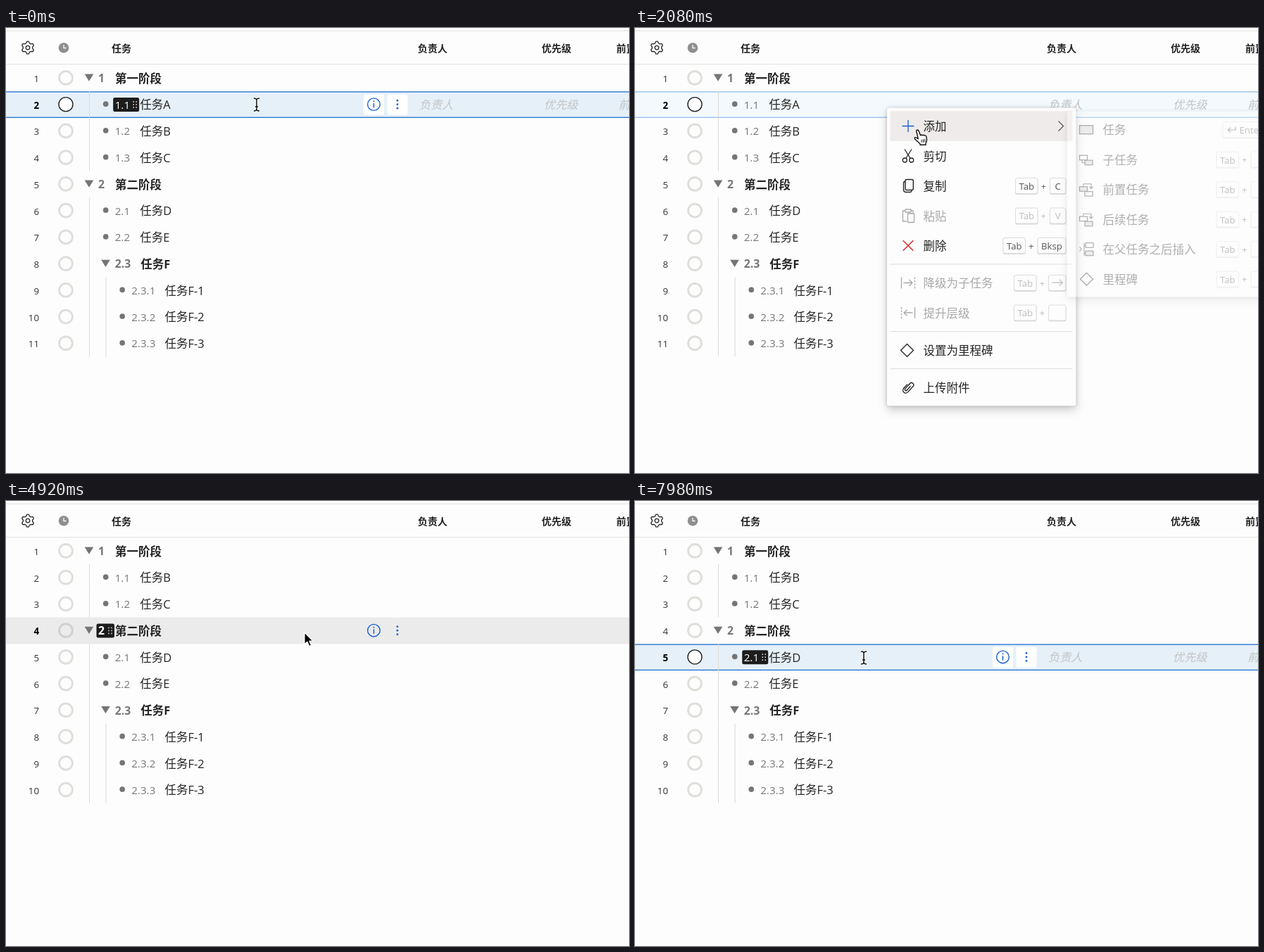
An HTML page for the animation above (8000 ms loop, 885 by 633 pixels).

```html
<!DOCTYPE html>
<html lang="zh-CN">
<head>
<meta charset="utf-8">
<title>任务列表</title>
<style>
html, body { margin: 0; width: 100%; height: 100%; overflow: hidden; background: #fdfdfd; }
svg { display: block; position: absolute; left: 0; top: 0; }
text { font-family: 'Open Sans', 'Noto Sans CJK SC', 'Noto Sans CJK', 'Noto Sans', sans-serif; white-space: pre; }
.popup { filter: drop-shadow(0 6px 7px rgba(0,0,0,.17)) drop-shadow(0 0 2px rgba(0,0,0,.2)); }
</style>
</head>
<body>
<svg id="stage" width="885" height="633" viewBox="0 0 885 633"></svg>
<script>
const LOOP = 8000, ROW = 37.75, TOP = 52.3;
const MENU_OPEN = 780, ENTER = 1640, SUB_OPEN = 2050, ON_CUT = 2440, SUB_CLOSE = 2750, CUT = 4400, SELECT = 7300;
const INK = '#242424', BLUE = '#1a5fd0', DIM = '#a9a9a9';

// drawing helpers, all returning SVG markup
const text = (x, y, s, size, fill = INK, more = '') =>
  `<text x="${x}" y="${y + size * .37}" font-size="${size}" fill="${fill}" ${more}>${s}</text>`;
const rect = (x, y, w, h, fill, more = '') =>
  `<rect x="${x}" y="${y}" width="${w}" height="${h}" fill="${fill}" ${more}/>`;
const circle = (x, y, r, fill, more = '') => `<circle cx="${x}" cy="${y}" r="${r}" fill="${fill}" ${more}/>`;
const path = (d, stroke = INK, width = 1.3, fill = 'none') =>
  `<path d="${d}" stroke="${stroke}" stroke-width="${width}" fill="${fill}" stroke-linejoin="round"/>`;
const at = (x, y, s, more = '') => `<g transform="translate(${x} ${y})" ${more}>${s}</g>`;
const BOLD = 'font-weight="700"', SEMI = 'font-weight="600"', RIGHT = 'text-anchor="end"', MID = 'text-anchor="middle"';
const clamp = v => Math.max(0, Math.min(1, v));

// number, title; the depth follows from the number
const BEFORE = [
  ['1', '第一阶段'], ['1.1', '任务A'], ['1.2', '任务B'], ['1.3', '任务C'],
  ['2', '第二阶段'], ['2.1', '任务D'], ['2.2', '任务E'], ['2.3', '任务F'],
  ['2.3.1', '任务F-1'], ['2.3.2', '任务F-2'], ['2.3.3', '任务F-3']];
const AFTER = BEFORE.filter((r, i) => i != 1).map(([n, s]) => [n == '1.2' ? '1.1' : n == '1.3' ? '1.2' : n, s]);

// cursor hot spot: time, x, y
const TRACK = [
  [1580, 356, 109], [1900, 400, 142], [2330, 404, 152], [2500, 414, 174], [2800, 424, 188],
  [4300, 424, 187], [5100, 424, 187], [5700, 351, 215], [6050, 351, 215], [6520, 327, 222], [6850, 325, 223]];

function cursorAt(t) {
  const i = TRACK.findIndex(k => k[0] > t);
  if (i == 0) return TRACK[0].slice(1);
  if (i < 0) return TRACK[TRACK.length - 1].slice(1);
  const [a, b] = [TRACK[i - 1], TRACK[i]], u = (t - a[0]) / (b[0] - a[0]), e = u * u * (3 - 2 * u);
  return [1, 2].map(k => a[k] + (b[k] - a[k]) * e);
}

function gearPath() {
  let d = '';
  for (let i = 0; i < 24; i++) {
    const a = (i - .5) * Math.PI / 12, r = i % 4 < 2 ? 9 : 6.7;
    d += `${i ? 'L' : 'M'}${(r * Math.sin(a)).toFixed(2)} ${(-r * Math.cos(a)).toFixed(2)}`;
  }
  return d + 'Z';
}

const HEADER =
  rect(0, 3.5, 885, 1, '#e2e2de') + rect(0, 51, 885, 1, '#e2e2de') +
  at(31, 28, path(gearPath()) + circle(0, 0, 2.8, 'none', `stroke="${INK}" stroke-width="1.3"`)) +
  circle(82, 28.2, 7.3, '#8e8e8e') + path('M82 24v4.5h3.5', '#fff', 1.3) +
  [[150, '任务'], [585, '负责人'], [761, '优先级'], [867, '前置任务']].map(([x, s]) => text(x, 28.5, s, 14, INK, BOLD)).join('');

function grip(x, y) {
  let s = '';
  for (const dx of [0, 4]) for (const dy of [-4, 0, 4]) s += rect(x + dx - .8, y + dy - .8, 1.6, 1.6, '#d8d8d8');
  return s;
}

function row([num, title], i, rows, hover, focus, strong) {
  const y = TOP + ROW * i, c = y + ROW / 2, depth = num.split('.').length - 1;
  const group = rows[i + 1] && rows[i + 1][0].startsWith(num + '.');
  const on = hover || focus, x = 118 + 23.5 * depth, numX = depth ? x + 13.2 : 131;
  let s = '';
  if (focus) {
    const line = strong ? '#1068cf' : '#8cb9ea';
    s += rect(0, y, 885, ROW, strong ? '#e6f0f8' : '#f3f9fd') +
      rect(0, y + .2, 885, 1.2, line) + rect(0, y + ROW - 1.2, 885, 1.2, line);
  } else if (hover) s += rect(0, y, 885, ROW, '#ebebeb');

  for (let k = 1; k <= depth; k++) s += rect(94.5 + 23.5 * k, y, 1, ROW, '#dadad5');
  s += text(47, c + .8, i + 1, 13.3, on ? '#000' : '#333', RIGHT + (on ? BOLD : ''));
  s += focus ? circle(85, c - .3, 10, '#fff', 'stroke="#222" stroke-width="1.4"')
    : circle(85, c - .3, 9.4, 'none', `stroke="${hover ? '#d0d0ce' : '#dedeDA'}" stroke-width="2.9"`);
  s += group ? `<path d="M${x - 6.3} ${c - 5.8}h12.6l-6.3 10.4z" fill="#757575"/>` : circle(x + .2, c - .8, 3.8, '#757575');

  if (hover) {
    const w = depth ? 37 : 25.5;
    s += rect(numX - 2.5, c - 10, w, 20, '#1c1c1c', 'rx="2.5"') + grip(numX + w - 10.5, c);
  }
  s += text(numX, c + .1, num, group ? 15.8 : 15.2, hover ? '#fff' : '#777', group ? BOLD : '');
  s += text(depth ? numX + [0, 35.5, 47.3][depth] + (group ? 1 : 0) : 155, c + .3, title, 16.5, INK, group ? BOLD : '');

  if (on && !group)
    for (const [px, p] of [[588, '负责人'], [765, '优先级'], [871, '前置任务']])
      s += text(px - 1, c, p, 16.2, '#c2c4c6', 'font-style="italic"');
  if (hover) {
    if (focus) s += rect(508, c - 14.5, 29, 29, '#fff', 'rx="2"') + rect(541.5, c - 14.5, 29, 29, '#fff', 'rx="2"');
    s += circle(522.5, c - .3, 8.8, 'none', `stroke="${BLUE}" stroke-width="1.4"`) +
      path(`M522.5 ${c - 2}v6.5`, BLUE, 1.5) + circle(522.5, c - 4.6, 1, BLUE);
    for (const d of [-5.5, 0, 5.5]) s += circle(556, c - .3 + d, 1.4, BLUE);
  }
  return s;
}

// icons around their own centre, each given a colour
const diamond = c => path('M0-9L9 0L0 9L-9 0Z', c, 1.4);
const box = (x, y, fill = '#cfcfcf') => rect(x, y, 11, 6.5, fill, `stroke="${INK}" stroke-width="1.2"`);
const ICON = {
  add: c => path('M-8.5 0H8.5M0-8.5V8.5', c),
  cut: c => circle(-4.7, 6, 3, 'none', `stroke="${c}" stroke-width="1.3"`) +
    circle(4.7, 6, 3, 'none', `stroke="${c}" stroke-width="1.3"`) + path('M-3.2 3.5L5-9.5M3.2 3.5L-5-9.5', c),
  copy: c => path('M-2-9H5Q7.3-9 7.3-7V4Q7.3 6 5 6H-2Q-4 6-4 4V-7Q-4-9-2-9ZM-4-6.5Q-6.5-6-6.5-4V5Q-6.5 9-3 9H3Q5 9 5.5 6', c, 1.4),
  paste: c => path('M-2 8H-7.5V-7H-4M4-7H7V-4M-4-9H4V-5H-4ZM-.5-3H8.5V9.5H-.5Z', c),
  remove: c => path('M-7.3-7.3L7.3 7.3M7.3-7.3L-7.3 7.3', c, 1.5),
  indent: c => path('M-9.5-8V8M-6.500 0H6M1.500-4.500L6 0L1.500 4.500', c) +
    `<path d="M9.500-8V8" stroke="${c}" stroke-width="1.4" stroke-dasharray="2.500 2"/>`,
  outdent: c => `<g transform="scale(-1 1)">${ICON.indent(c)}</g>`,
  mile: c => at(-1.5, 0, diamond(c)),
  clip: c => `<g transform="rotate(42)">${path('M-4-3V5A4 4 0 0 0 4 5V-6A3 3 0 0 0-2-6V4A1.500 1.500 0 0 0 1.200 4V-4', c, 1.4)}</g>`,
  task: () => rect(-9.5, -6, 19, 12, '#cfcfcf', `stroke="${INK}" stroke-width="1.3"`),
  child: () => box(-9.5, -6, '#fff') + box(-2, 1) + path('M-6 .5V4.500H-2', INK, 1.1),
  before: () => box(-9.5, -4) + box(-2, 3, '#fff') + path('M-4-5V-8H7V-1M4.500-4L7-1L9.500-4', INK, 1.1),
  after: () => box(-9.5, -4, '#fff') + box(-2, 3) + path('M-4-5V-8H7V-1M4.500-4L7-1L9.500-4', INK, 1.1),
  parent: () => path('M-9.500-3L-6.500 0L-9.500 3M-3-9V9M-3-5H0M-3 6H0', INK, 1.1) + box(-1, -9, '#fff') + box(-1, 2.5)
};

const ITEMS = [
  [139.5, 'add', '添加'], [182, 'cut', '剪切'], [224.5, 'copy', '复制', 23.5, 'C'],
  [267, 'paste', '粘贴', 23.5, 'V', 1], [309.5, 'remove', '删除', 41, 'Bksp'],
  [362.5, 'indent', '降级为子任务', 25.5, '→', 1], [405, 'outdent', '提升层级', 25.5, '←', 1],
  [458.5, 'mile', '设置为里程碑'], [511.5, 'clip', '上传附件']];
const SUBITEMS = [['task', '任务'], ['child', '子任务'], ['before', '前置任务'],
  ['after', '后续任务'], ['parent', '在父任务之后插入'], ['mile', '里程碑']];

const keyBox = (x, y, w, label, c) =>
  rect(x, y - 10.5, w, 23, '#d9d9d9', 'rx="3"') +
  rect(x + .5, y - 11, w - 1, 22, '#fdfdfd', 'rx="2.5" stroke="#dcdcdc"') +
  (label == '→' || label == '←'
    ? at(x + w / 2, y - .3, path('M-7.500 0H7.500M3-4.500L7.500 0L3 4.500', c, 1.2), label == '←' ? 'style="rotate:180deg"' : '')
    : text(x + w / 2, y + .6, label, 13.2, c, MID));
const shortcut = (x, y, w, label, c) =>
  keyBox(x - 49, y, 32.5, 'Tab', c) + text(x - 8.8, y + .3, '+', 13.2, c, MID) + keyBox(x, y, w, label, c);

function menu(t) {
  const over = t < ENTER ? -1 : t < ON_CUT ? 0 : 1, open = t > SUB_OPEN && t < SUB_CLOSE;
  let s = rect(358, 113.5, 268.5, 424, '#fdfdfd', 'rx="3" class="popup"');
  ITEMS.forEach(([y, icon, label, w, key, off], i) => {
    if (i == over || (i == 0 && open)) s += rect(362.5, y - 21.2, 259, 42.5, i == over ? '#eeebea' : '#efefed');
    const c = off ? DIM : INK;
    s += at(388, y, ICON[icon](i == over ? BLUE : icon == 'remove' ? '#d92b2b' : c)) + text(409.5, y + .5, label, 16.5, c);
    if (key) s += shortcut(612.5 - w, y, w, key, off ? '#bdbdbd' : '#555');
  });
  s += path('M601.500 132.500l7 7l-7 7', '#555', 1.2);
  for (const y of [335.5, 431.2, 484.2]) s += rect(362.5, y, 259, 1, '#dadde0');
  return s;
}

function submenu() {
  let s = rect(620, 118.5, 290, 264, '#fdfdfd', 'rx="3" class="popup"');
  SUBITEMS.forEach(([icon, label], i) => {
    const y = 144.7 + 42.5 * i;
    s += at(icon == 'mile' ? 649.5 : 647.5, y, ICON[icon](INK)) + text(671, y + .5, label, 16.5);
    if (i) s += shortcut(881, y, 24, '', '#555');
    else s += keyBox(841, y, 62, '', '#555') + path('M859.500 140.500v4.500h-10M852.500 141.500l-3.500 3.500l3.500 3.500', '#555', 1.2) +
      text(865, y + .6, 'Enter', 13.2, '#555');
  });
  return s;
}

const POINTER = {
  beam: path('M-4-9Q0-9 0-6Q0-9 4-9M0-7V7M-4 9Q0 9 0 6Q0 9 4 9', '#fff', 3.5) +
    path('M-4-9Q0-9 0-6Q0-9 4-9M0-7V7M-4 9Q0 9 0 6Q0 9 4 9M-2 3H2', '#111', 1.5),
  arrow: path('M0 0V17L4 13.300L6.800 19.500L9.600 18.200L6.900 12.200H12Z', '#fff', 1.2, '#000'),
  hand: path('M-1.500 2Q-2.500-.500-.500-.800Q1-.800 1.800 1.200L4 7Q5.500 5.500 7 7Q8.500 5.800 9.800 7.200Q11.800 6.500 12.300 8.500L13 13Q13 16 11.500 18V20.500H3.500V19L-3 13Q-5.500 10.500-3.500 9.800Q-2 9.500.800 11.800Z', '#111', 1.4, '#fff') +
    path('M5.500 13V17M8 12.500V17M10.200 12V16.500', '#111', 1)
};

function scene(t) {
  const [cx, cy] = cursorAt(t), cut = t >= CUT, rows = cut ? AFTER : BEFORE;
  const inMenu = t >= ENTER && !cut, showMenu = t >= MENU_OPEN && !cut;
  const hover = inMenu ? -1 : Math.floor((cy - TOP) / ROW);
  const focus = !cut ? 1 : t >= SELECT ? 4 : -1, strong = t < MENU_OPEN || t >= SELECT;
  let s = HEADER + rows.map((r, i) => row(r, i, rows, i == hover, i == focus, strong)).join('');
  if (showMenu) {
    const u = clamp((t - MENU_OPEN) / 360), left = (1 - u) ** 4;
    s += at(0, t < ENTER ? -.5 - 9.5 * left : 0, menu(t), `opacity="${1 - left}"`);
  }
  if (t > SUB_OPEN && t < SUB_CLOSE) {
    const left = (1 - clamp((t - SUB_OPEN) / 300)) ** 4;
    s += at(-10 * left, 0, submenu(), `opacity="${1 - left}"`);
  }
  const kind = inMenu ? 'hand' : strong || !cut ? 'beam' : 'arrow';
  return s + at(cx, cy, POINTER[kind]);
}

const stage = document.getElementById('stage'), start = performance.now();
function frame() {
  stage.innerHTML = scene((performance.now() - start) % LOOP);
  requestAnimationFrame(frame);
}
frame();
</script>
</body>
</html>
```
